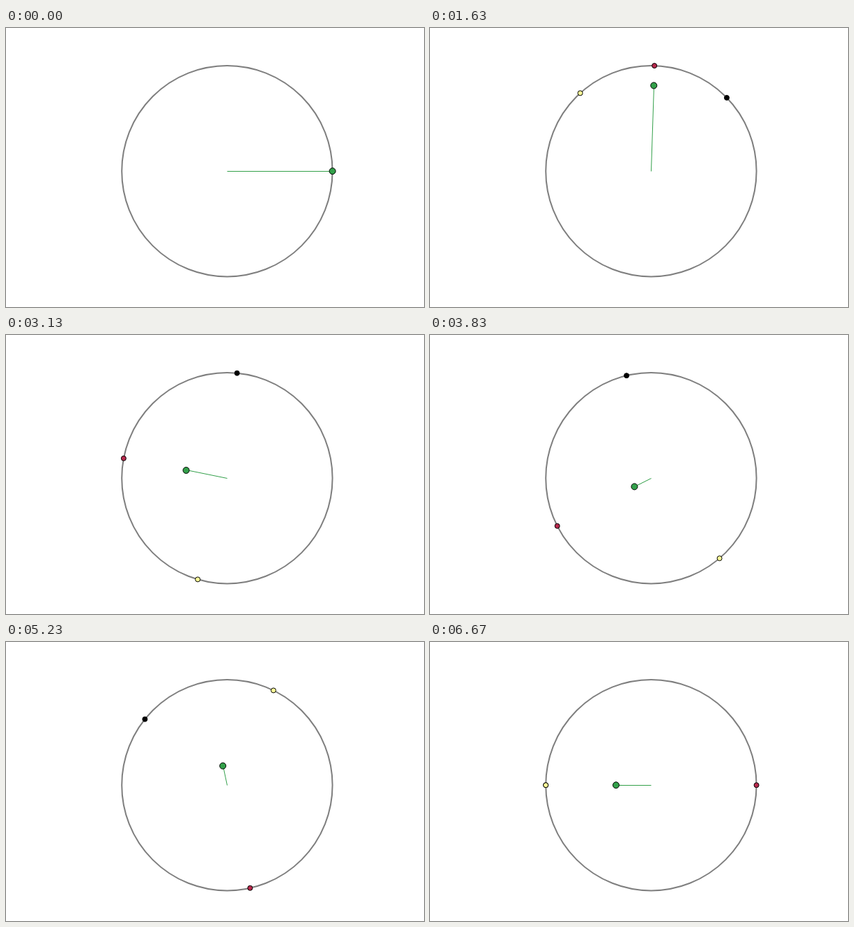
Write an HTML page with a canvas that moves like this. It is 600 px wide and 400 px high and loops after 6710 ms.

```html
<!DOCTYPE html>
<html lang="en">
<head>
<meta charset="utf-8">
<title>Centroid of three orbiting points</title>
<style>
  html, body { margin: 0; width: 100%; height: 100%; overflow: hidden; background: #fff; }
  canvas { display: block; }
</style>
</head>
<body>
<canvas id="stage" width="600" height="400"></canvas>
<script>
const ctx = document.getElementById('stage').getContext('2d');
const LOOP = 6710, STEPS = 200;
const CX = 317.4, CY = 205.2, R = 151.2;
const GREEN = '#33a04a';
const COLORS = ['#000000', '#b8294d', '#ffff99'];

// Steps come at 30 steps per second, rounded to 10 ms.
function stepAt(t) {
  const r = t % 100;
  const k = 3 * Math.floor(t / 100) + (r >= 30) + (r >= 70);
  return Math.min(STEPS, k);
}

function dot(p, radius, fill) {
  ctx.beginPath();
  ctx.arc(p.x, p.y, radius, 0, 2 * Math.PI);
  ctx.fillStyle = fill;
  ctx.fill();
  ctx.strokeStyle = '#000';
  ctx.lineWidth = 1;
  ctx.stroke();
}

const snap = v => Math.floor(v) + 0.5;

function draw(t) {
  const angle = Math.PI * stepAt(t) / STEPS;
  const points = [1, 2, 3].map(n => ({
    x: CX + R * Math.cos(n * angle),
    y: CY - R * Math.sin(n * angle)
  }));
  const mean = key => points.reduce((sum, p) => sum + p[key], 0) / points.length;
  const center = { x: mean('x'), y: mean('y') };

  ctx.fillStyle = '#fff';
  ctx.fillRect(0, 0, 600, 400);

  ctx.beginPath();
  ctx.arc(CX, CY, R, 0, 2 * Math.PI);
  ctx.strokeStyle = '#7f7f7f';
  ctx.lineWidth = 2;
  ctx.stroke();

  ctx.beginPath();
  ctx.moveTo(snap(CX), snap(CY));
  ctx.lineTo(snap(center.x), snap(center.y));
  ctx.strokeStyle = GREEN;
  ctx.lineWidth = 1;
  ctx.stroke();

  points.forEach((p, i) => dot(p, 3.5, COLORS[i]));
  dot(center, 4.5, GREEN);
}

const start = performance.now();
function tick() {
  draw((performance.now() - start) % LOOP);
  requestAnimationFrame(tick);
}
tick();
</script>
</body>
</html>
```
